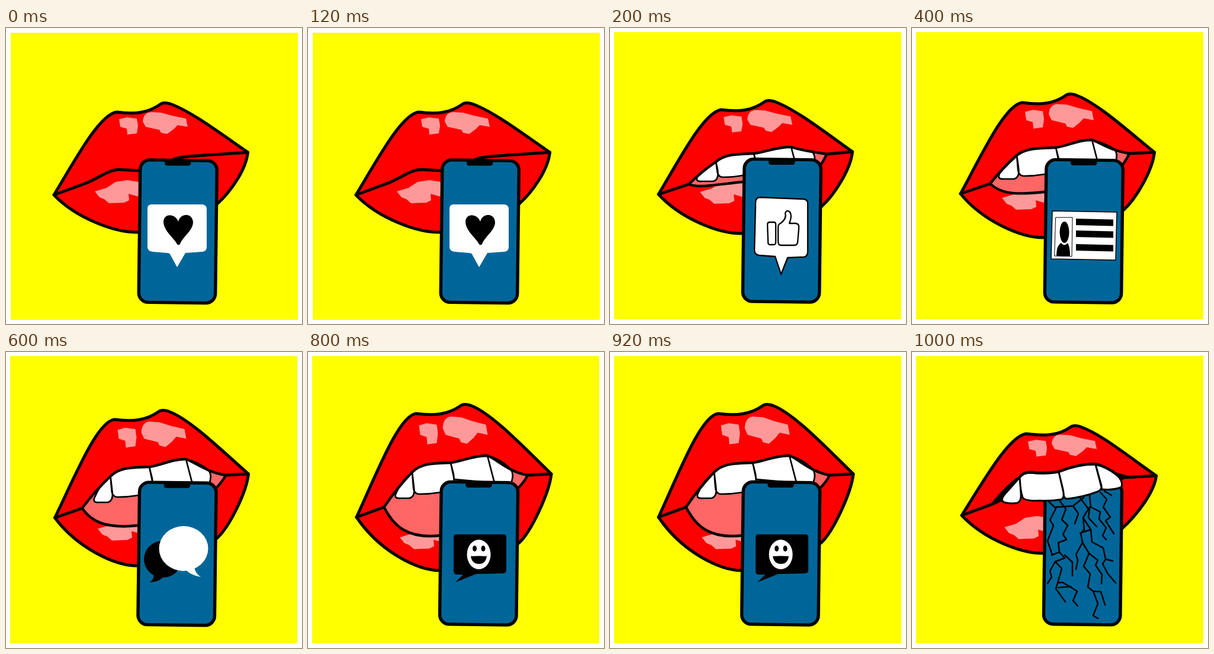
An HTML page for the animation above (1.2 s loop, 500x500 px).

```html
<!DOCTYPE html>
<html lang="en">
<head>
<meta charset="utf-8">
<title>Lips and phone</title>
<style>
html, body { margin: 0; width: 100%; height: 100%; overflow: hidden; background: #fff; }
svg { display: block; width: 100%; height: 100%; stroke-linejoin: round; stroke-linecap: round; }
</style>
</head>
<body>
<svg id="stage" viewBox="0 0 500 500"></svg>
<script>
const STEP = 200;
const BLUE = '#006699', RED = '#ff0000', PINK = '#ff6666', SHINE = '#ff9999';

const shape = (d, fill = 'none', width = 0) =>
  `<path d="${d}" fill="${fill}"` + (width ? ` stroke="#000" stroke-width="${width}"/>` : '/>');
const oval = (x, y, rx, ry, fill) =>
  `<ellipse cx="${x}" cy="${y}" rx="${rx}" ry="${ry}" fill="${fill}"/>`;
const move = (transform, body) => `<g transform="${transform}">${body}</g>`;
// Point p shifted by (x, y)
const at = (p, x = 0, y = 0) => `${p[0] + x} ${p[1] + y} `;

// L, R: lip corners; p, q: upper peaks; E, B: lower lip where it meets the phone
// shine: dx, top, stretch of the upper glints; low: offset of the lower glint
// M, N: mouth corners; a, b, c: tooth tops; k: first tooth tip; t: second tooth base; d: mouth floor
const poses = [
  { L: [81, 282], p: [187, 142], q: [267, 127], R: [408.5, 210], E: [357, 297], B: [223, 345],
    shine: [0, 142, 1], low: [0, 0], phone: [0, 0] },
  { L: [82, 281], p: [188, 138], q: [267, 123], R: [409.5, 209], E: [357, 302], B: [223, 347],
    shine: [1, 138.5, 1], low: [2, 1], phone: [0, -1.5],
    M: [133, 264], a: [179, 226], b: [243, 212], c: [306, 201], N: [366, 213], k: [146, 254], t: 249, d: 260 },
  { L: [82, 280], p: [186, 126], q: [266, 112], R: [409.5, 210], E: [357, 308], B: [223, 354],
    shine: [0, 128.5, 1.09], low: [2, 11], phone: [0, -0.5],
    M: [132, 263], a: [177, 215], b: [243, 202], c: [304, 189], N: [367, 212], k: [146, 250], t: 247, d: 277 },
  { L: [82.5, 280], p: [183, 114], q: [264, 99], R: [409.5, 206], E: [356, 315], B: [223, 361],
    shine: [-2.5, 117.5, 1.16], low: [5, 22.5], phone: [-1.3, -2.8],
    M: [128.5, 264], a: [176.5, 210], b: [242, 194], c: [304, 181], N: [371, 208], k: [148, 249], t: 242, d: 293 },
  { L: [82, 279], p: [182.5, 104], q: [264, 89], R: [411, 206], E: [356, 323], B: [223, 369],
    shine: [-3.5, 109, 1.24], low: [5, 37], phone: [-1.7, -3.5],
    M: [128.5, 262], a: [176, 203], b: [241, 187], c: [303, 175], N: [371, 208], k: [147, 242], t: 237, d: 310 },
  { L: [84, 276], p: [193, 138], q: [274, 125], R: [412.5, 209], E: [354, 299], B: [223, 340],
    shine: [5, 139.5, 0.98], low: [6, 20], phone: [-1.8, -3.7], bite: true }
];

function lips({ L, p, q, R, E, B, shine: [dx, top, s], low }) {
  const outline = 'M' + at(L) +
    'C' + at(L, 0.36 * (p[0] - L[0]), 0.45 * (p[1] - L[1])) + at(p, -29, 4) + at(p) +
    'C' + at(p, 30, 4) + at(q, -27, 17) + at(q, -5, 1) +
    'Q' + at(q, 0, -2) + at(q, 10, 1) +
    'C' + at(q, 45, 13) + at(R, -46, -0.38 * (R[1] - q[1])) + at(R) +
    'C' + at(R, -3, 30) + at(E, 22, -20) + at(E) + 'L' + at(B) +
    'C' + at(B, -38, 1) + at(L, 38, 0.63 * (B[1] - L[1])) + at(L) + 'Z';
  const upper =
    'M191 154L204 151L221 153L223 165L221 178L205 180L204 170L193 167Z' +
    'M231 158Q232 143 245 142L262 143L280 148L304 153L307 167L290 164L283 171L272 179L262 177L259 172L236 167Z';
  const lower =
    'M150 276L170 270L185 260L205 257L224 260V285L207 280L208 291L200 295L174 296L166 289L158 286Z';
  return shape(outline, RED, 5) +
    move(`translate(${dx} ${top}) scale(1 ${s}) translate(0 -142)`, shape(upper, SHINE)) +
    move(`translate(${low})`, shape(lower, SHINE));
}

function closedMouth({ L, R }) {
  return shape('M' + at(L) + 'L130 264C155 255 172 240 190 239L226 241M281 223C294 216 310 217 ' + at(R), 'none', 5);
}

function openMouth({ L, R, M, N, a, b, c, k, t, d }) {
  const top = 'M' + at(M) +
    'Q' + at(M, 0.45 * (a[0] - M[0]), 0.54 * (a[1] - M[1])) + at(a) +
    `C${a[0] + 14} ${b[1] + 2} ${a[0] + 30} ${b[1] + 1} ` + at(b) +
    'C' + at(b, 25, -4) + at(c, -25) + at(c) +
    'C' + at(c, 15, 5) + at(N, -32, -5) + at(N);
  const right = 'Q' + at(N, -4, 10) + `350 ${N[1] + 27}`;
  const floor = `C168 ${d + 6} ` + at(M, 16, (d - M[1]) / 2 + 8) + at(M);
  const e = [342, c[1] + 0.68 * (N[1] - c[1])];
  const base = k[1] + 5;
  const teeth = [
    'M' + at(a) + 'Q' + at(a, -18, 14) + at(k, 3, -6) + 'Q' + at(k, -4, 6) + at(k, 9, 5) + `L${a[0] - 5} ${base}` +
      `Q${a[0] + 5} ${base - 2} ${a[0] + 3} ${base - 18}Z`,
    'M' + at(a) + `L${a[0] + 2} ${t - 8}Q${a[0] + 3} ${t + 3} ${a[0] + 12} ${t + 3}` +
      `Q${a[0] + 30} ${t + 3} 224 ${t}L248 ${t}L` + at(b, 5, 20) + 'L' + at(b) +
      `C${a[0] + 30} ${b[1] + 1} ${a[0] + 14} ${b[1] + 2} ` + at(a),
    'M' + at(b) + 'L' + at(b, 6, 28) + 'L' + at(c, 12, 46) + 'L' + at(c) +
      'C' + at(c, -25) + at(b, 25, -4) + at(b),
    'M' + at(c) + 'Q' + at(c, 22, 5) + at(e) + 'Q' + at(e, 7, 9) + at(e, 1, 24) + 'L' + at(c, 12, 46) + 'Z'
  ].join('');
  return shape(top + right + `L223 ${d}` + floor + 'Z', PINK) +
    shape(teeth, '#fff', 2.7) +
    shape(top + right + `M223 ${d}` + floor, 'none', 4.4) +
    shape('M' + at(L) + 'L' + at(M) + 'M' + at(R) + 'L' + at(N), 'none', 5);
}

function bite({ L, R }) {
  const teeth =
    'M182 212L157 240Q148 251 156 254Q166 257 178 255Q185 252 184 240Z' +
    'M182 212Q188 204 200 204Q225 207 248 203L255 232Q258 247 252 249Q235 252 215 251Q191 252 187 246Q183 235 182 212Z' +
    'M248 203Q280 189 310 190L320 226Q321 233 313 236Q290 245 262 248Q256 248 256 238Z' +
    'M310 190Q328 194 345 207Q357 217 354 228Q340 234 321 232Z';
  return shape('M' + at(L) + 'L133 258L153 249M345 207L360 212L' + at(R), 'none', 5) +
    shape('M133 258Q160 224 182 210L152 250ZM343 204L364 210L354 216Z', '#000', 2) +
    shape(teeth, '#fff', 3) +
    shape('M182 211Q188 203 200 203Q225 206 248 202Q280 189 310 189Q328 193 346 207', 'none', 4.5);
}

const cracks = shape(
  'M228 250L243 264L233 284L239 293L229 319L237 343' +
  'M243 262L272 260L290 246M250 252L260 265L253 283L263 293L255 308L261 317L247 322L249 338L236 343' +
  'M249 338L258 348L242 354L233 370L236 380L229 391M242 354L253 366L243 400L259 422' +
  'M247 390L254 389L279 404L272 420L280 429M247 398L268 396M258 343L271 355V378' +
  'M272 260L281 273L275 290M283 245L298 265L289 280L291 300L285 306L288 322L277 342L280 352L277 367' +
  'M302 300L284 306M288 322L299 340L290 362L301 375L297 397L306 404L314 425L306 445L314 450' +
  'M306 404L319 405L326 427M299 340L314 352L310 360L321 376L320 391' +
  'M289 280L302 300L304 321L323 331L327 350L339 353M327 350L322 358L331 375L344 390' +
  'M300 243L302 262L318 270L316 282L328 297L322 310L328 317M300 262L298 280L312 295' +
  'M318 237L329 249L323 262L335 279L327 285L341 307M325 235L337 242', 'none', 2.5);

const phone = ([x, y]) => move(`translate(${x} ${y})`,
  `<rect x="225.5" y="223.5" width="129.5" height="240.5" rx="16" fill="${BLUE}" stroke="#000"
    stroke-width="5.4" transform="rotate(.7 290 344)"/>` +
  shape('M268 222H312.5V228Q312 232.5 308 232.5H272Q268 232 268 228Z', '#000'));

const icons = [
  // Heart
  shape('M239 305Q239 298 246 298L332 298Q339 299 339 306V371Q338 378 331 378L303 380L289 404L277 382Q276 380 272 380L248 378Q240 377 239 371Z', '#fff') +
  shape('M291 327C286 313 266 312 266 328C267 343 283 354 289 365Q291 368 294 365C299 352 316 342 316 328C315 312 295 312 291 327Z', '#000'),
  // Thumb
  shape('M253 286L327 289Q335 290 334 298V379Q333 388 324 387L300 388L289 416L279 386L252 384Q244 383 244 375L246 293Q247 286 253 286Z', '#fff', 2.3) +
  shape('M270 328H277Q280 328 280 332V362Q280 366 276 366H270Q267 366 267 362L266 332Q266 328 270 328Z' +
    'M284 337Q284 331 288 330Q299 322 296 313Q298 306 304 311Q308 317 303 330L314 330Q320 331 319 338L317 362Q316 367 311 367H289Q284 367 284 361Z', '#fff', 2.3),
  // Profile card
  shape('M237 309L346 311L344 392L235 390Z', '#fff', 1.5) +
  shape('M243 320H271L270 386L241 385Z', '#fff', 1) +
  oval(257.5, 345, 8, 18, '#000') +
  shape('M244 385Q244 367 252 363Q257 370 263 363Q267 370 267 385Z' +
    [322, 342, 365].map(y => `M277 ${y}l63 1.5v11l-63 -1.5Z`).join(''), '#000'),
  // Chat
  oval(265, 350, 32, 31, '#000') +
  shape('M250 374Q250 384 243 389Q262 388 266 378Z', '#000') +
  oval(300, 332, 41.5, 38, '#fff') +
  shape('M303 367Q311 377 329 380Q320 374 318 364Z', '#fff'),
  // Smile
  shape('M251 308H330Q335 308 335 313V369Q335 373 330 374L284 375L249 389L262 376H252Q246 376 246 371V313Q246 308 251 308Z', '#000') +
  oval(288.5, 342, 20, 25, '#fff') + oval(281.5, 332, 3.5, 5, '#000') + oval(296, 332, 3.5, 5, '#000') +
  shape('M275 345Q289 344 302 345Q300 358 289 358Q277 358 275 345Z', '#000'),
  cracks
];

const scenes = poses.map((pose, i) => {
  const device = phone(pose.phone) + icons[i];
  const front = pose.bite ? device + bite(pose)
    : (pose.M ? openMouth(pose) : closedMouth(pose)) + device;
  const edge = i ? 7 : 8;
  return `<rect x="${edge}" y="${edge}" width="485" height="485" fill="#ffff00"/>` + lips(pose) + front;
});

const stage = document.getElementById('stage');
let shown = -1;
function draw() {
  const i = Math.floor(performance.now() / STEP) % scenes.length;
  if (i !== shown) stage.innerHTML = scenes[shown = i];
  requestAnimationFrame(draw);
}
draw();
</script>
</body>
</html>
```
